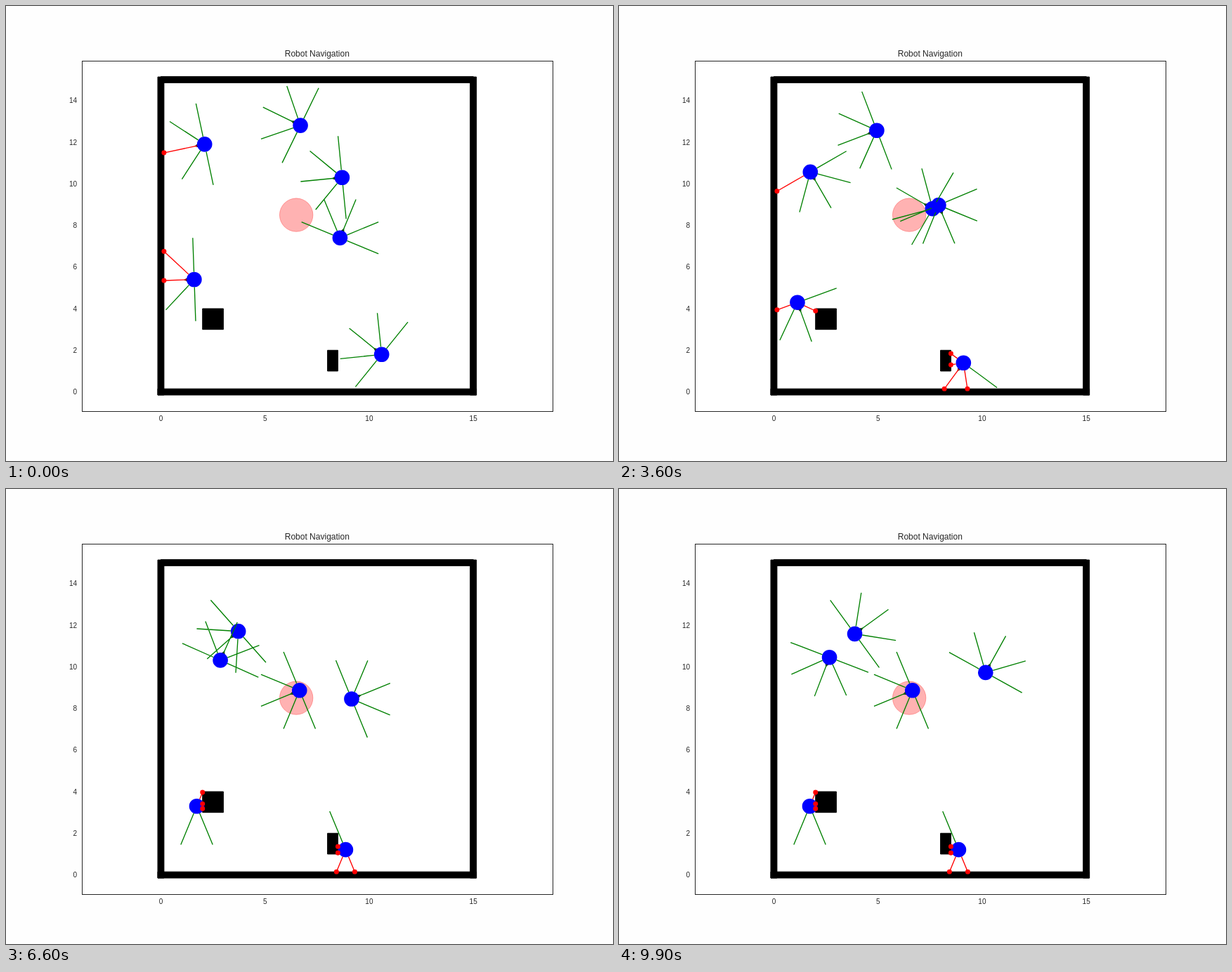
Animation, 864 px wide and 648 px high, one loop 10000 ms. Source, as an HTML page:

```html
<!DOCTYPE html>
<html lang="en">
<head>
<meta charset="utf-8">
<title>Robot Navigation</title>
<style>
html, body { margin: 0; width: 100%; height: 100%; overflow: hidden; background: #fefefe; }
svg { display: block; }
text { font: 10px "Liberation Sans", Arial, sans-serif; fill: #262626; text-anchor: middle; }
.ray { fill: none; stroke-width: 1.35; }
</style>
</head>
<body>
<svg width="864" height="648" viewBox="0 0 864 648">
  <rect x="108.5" y="78.5" width="670" height="499" fill="#fff" stroke="#262626"/>
  <text x="442.8" y="72" style="font-size:12px">Robot Navigation</text>
  <g id="ticks"></g>
  <path id="walls" stroke="#000"/>
  <path id="goal" fill="#f00" stroke="#f00" fill-opacity=".3" stroke-opacity=".3"/>
  <path id="arrows"/>
  <path id="bodies" fill="#00f"/>
  <path id="free" class="ray" stroke="#008000"/>
  <path id="blocked" class="ray" stroke="#f00"/>
  <path id="hits" fill="#f00"/>
</svg>
<script>
const $ = id => document.getElementById(id);
const UNIT = 29.647, SPEED = 0.05, RANGE = 2, RADIUS = 0.365;
const RAD = Math.PI / 180;

// Plot units to pixels
const px = x => 220.45 + x * UNIT;
const py = y => 549.59 - y * UNIT;
const at = (x, y) => `${px(x).toFixed(2)} ${py(y).toFixed(2)}`;
const disc = (x, y, r) => {
  const p = r * UNIT;
  return `M${at(x - r, y)}a${p} ${p} 0 1 0 ${2 * p} 0a${p} ${p} 0 1 0 ${-2 * p} 0z`;
};

// Four walls and two blocks: left, bottom, right, top
const solids = [
  [-0.15, -0.15, 0.15, 15.13], [14.85, -0.15, 15.15, 15.13],
  [0, 14.85, 15, 15.15], [-0.15, -0.15, 15.15, 0.15],
  [2, 3, 3, 4], [8, 1, 8.5, 2],
];

// Start point and turning points [step, heading]; a robot rests after its last one
const robots = [
  { x: 2.1, y: 11.9, turns: [[0, 192], [9, 219], [13, 219], [24, 300], [43, 300], [66, 426], [99, 396]] },
  { x: 6.7, y: 12.8, turns: [[0, 154], [7, 190], [28, 190], [47, 216], [85, 227], [99, 249]] },
  { x: 8.7, y: 10.3, turns: [[0, 185.6], [77, 415], [99, 421]] },
  { x: 8.6, y: 7.4, turns: [[0, 67.5], [7, 121], [16, 121], [24, 139.5], [32, 139.5], [56, 202.5]] },
  { x: 1.6, y: 5.4, turns: [[0, 182], [14, 198], [20, 302], [27, 290], [49, 290], [60, 337.5]] },
  { x: 10.6, y: 1.8, turns: [[0, 141], [34, 244], [42, 202.5]] },
];

function headingAt(turns, n) {
  const i = turns.findIndex(([step]) => step >= n);
  if (i <= 0) return turns[0][1] * RAD;
  const [t0, h0] = turns[i - 1], [t1, h1] = turns[i];
  return (h0 + (h1 - h0) * (n - t0) / (t1 - t0)) * RAD;
}

// Drive at constant speed along the heading
function pose({ x, y, turns }, n) {
  n = Math.min(n, turns[turns.length - 1][0]);
  for (let k = 0; k < n; k++) {
    const h = headingAt(turns, k + 0.5);
    x += SPEED * Math.cos(h);
    y += SPEED * Math.sin(h);
  }
  return [x, y, headingAt(turns, n)];
}

// Distance along a ray to the nearest solid
function cast(x, y, c, s) {
  let best = Infinity;
  for (const [x0, y0, x1, y1] of solids) {
    const a = (x0 - x) / c, b = (x1 - x) / c, p = (y0 - y) / s, q = (y1 - y) / s;
    const near = Math.max(Math.min(a, b), Math.min(p, q));
    const far = Math.min(Math.max(a, b), Math.max(p, q));
    if (near > 0 && near < far) best = Math.min(best, near);
  }
  return best;
}

function draw(n) {
  const d = { arrows: '', bodies: '', free: '', blocked: '', hits: '' };
  for (const robot of robots) {
    const [x, y, heading] = pose(robot, n);
    const along = (r, c, s, side = 0) => at(x + r * c - side * s, y + r * s + side * c);
    const hc = Math.cos(heading), hs = Math.sin(heading);
    d.arrows += `M${along(0.5, hc, hs)}L${along(0.3, hc, hs, 0.1)}L${along(0.3, hc, hs, -0.1)}z`;
    d.bodies += disc(x, y, RADIUS);
    for (let k = -2; k <= 2; k++) {
      const c = Math.cos(heading + k * Math.PI / 4), s = Math.sin(heading + k * Math.PI / 4);
      const hit = cast(x, y, c, s), seen = hit < RANGE, len = seen ? hit : RANGE;
      d[seen ? 'blocked' : 'free'] += `M${along(Math.min(RADIUS, len), c, s)}L${along(len, c, s)}`;
      if (seen) d.hits += disc(x + len * c, y + len * s, 0.117);
    }
  }
  for (const id in d) $(id).setAttribute('d', d[id]);
}

let ticks = '';
for (let v = 0; v <= 15; v += 5) ticks += `<text x="${px(v)}" y="591">${v}</text>`;
for (let v = 0; v <= 14; v += 2)
  ticks += `<text x="101" y="${py(v) + 3.7}" style="text-anchor:end">${v}</text>`;
$('ticks').innerHTML = ticks;
$('walls').setAttribute('d', solids.map(([a, b, c, e]) => `M${at(a, b)}H${px(c)}V${py(e)}H${px(a)}z`).join(''));
$('goal').setAttribute('d', disc(6.5, 8.5, 0.8));

function tick() {
  draw(Math.floor(performance.now() / 100) % 100);
  requestAnimationFrame(tick);
}
tick();
</script>
</body>
</html>
```
